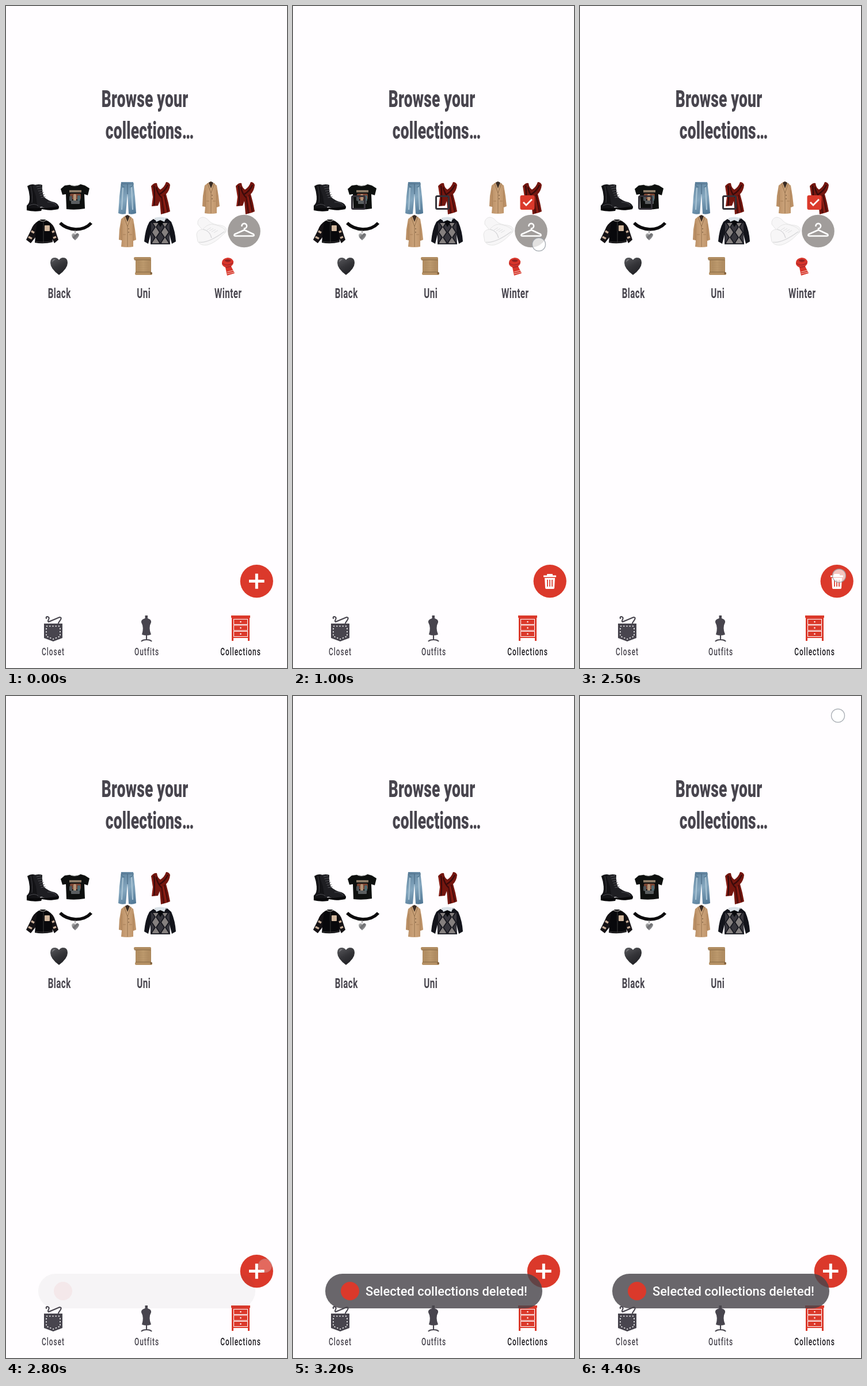
Animation of 488 by 1147 pixels, one loop 4500 ms. Source, as an HTML page with a canvas:

```html
<!DOCTYPE html>
<html lang="en">
<head>
<meta charset="utf-8">
<title>Wardrobe collections</title>
<style>
  html, body { margin: 0; width: 100%; height: 100%; overflow: hidden; background: #fffdff; }
  canvas { display: block; width: 100vw; height: 100vh; }
</style>
</head>
<body>
<canvas id="stage"></canvas>
<script>
const W = 488, H = 1147, LOOP = 4500;
const RED = '#db392b', INK = '#48454e', PAPER = '#fffdff';
const SELECT_AT = 700, DELETE_AT = 2700;
const CONDENSE = 0.66; // the display face is a narrow grotesque

const canvas = document.getElementById('stage');
const ctx = canvas.getContext('2d');
const ratio = window.devicePixelRatio || 1;
canvas.width = W * ratio;
canvas.height = H * ratio;

const clamp = v => Math.max(0, Math.min(1, v));

function shape(d, fill) {
  ctx.fillStyle = fill;
  ctx.fill(new Path2D(d));
}

function line(d, color, width = 1) {
  ctx.strokeStyle = color;
  ctx.lineWidth = width;
  ctx.stroke(new Path2D(d));
}

function disc(x, y, r, fill) {
  ctx.beginPath();
  ctx.arc(x, y, r, 0, Math.PI * 2);
  ctx.fillStyle = fill;
  ctx.fill();
}

function box(x, y, w, h, r, fill) {
  ctx.beginPath();
  ctx.roundRect(x, y, w, h, r);
  ctx.fillStyle = fill;
  ctx.fill();
}

function fade(x0, y0, x1, y1, ...colors) {
  const g = ctx.createLinearGradient(x0, y0, x1, y1);
  colors.forEach((c, i) => g.addColorStop(i / (colors.length - 1), c));
  return g;
}

function at(x, y, draw) {
  ctx.save();
  ctx.translate(x, y);
  draw();
  ctx.restore();
}

function label(text, x, y, size, weight, color, spacing = 0) {
  at(x, y, () => {
    ctx.scale(CONDENSE, 1);
    ctx.font = `${weight} ${size}px Roboto, sans-serif`;
    ctx.letterSpacing = spacing + 'px';
    ctx.textAlign = 'center';
    ctx.fillStyle = color;
    ctx.fillText(text, spacing / 2, 0);
  });
}

// Clothes

function boots() {
  shape('M37 312Q44 307 51 310L55 330L57 345L62 354Q50 357 36 353L36 346Q42 341 41 330Q40 320 37 312Z', '#131316');
  shape('M46 312Q54 307 63 310Q62 322 66 331Q74 338 84 340Q92 343 92 350L72 352L62 348L55 349L52 330Z', '#1e1e22');
  shape('M36 349Q50 352 62 349L70 350L92 347L91 352Q76 355 69 353L62 352L61 355Q48 357 36 354Z', '#08080a');
  for (let i = 0; i < 6; i++) line(`M${53 + i * 1.5} ${313 + i * 3.8}l8 -1.5`, '#55555a', 1);
  line('M43 312Q47 328 45 341', '#3c3c41');
  line('M72 340Q82 339 87 345M40 346Q48 341 56 346', '#4a4a50');
}

function shirt() {
  shape('M110 310Q120 314 130 309L137 311L145 316L142 328L136 326L137 351Q121 354 105 352L104 326L98 327L95 317L102 311Z', '#0e100f');
  line('M110 310Q120 316 130 309', '#2d302d', 1);
  box(110, 319, 21, 4, 0, '#8d7c68');
  box(111, 325, 19, 10, 2, '#7a4432');
  box(110, 329, 5, 9, 2, '#4d5357');
  box(117, 326, 5, 13, 2, '#b29377');
  box(124, 328, 5, 10, 2, '#4f6a70');
  box(113, 337, 15, 6, 1, '#5a5e60');
}

function jacket() {
  const arms = '#151215';
  shape('M57 372Q47 377 43 389L35 405L43 411L54 397Z', arms);
  shape('M73 373Q83 378 86 390L91 405L84 411L77 397Z', arms);
  shape('M54 374L60 370H68L75 374L79 381L81 409Q65 413 50 410L52 390Z', '#08080b');
  line('M44 390l5 3M39 400l6 3M84 390l-4 2M87 400l-5 2', '#c9ae98', 3.5);
  line('M58 371Q64 375 70 371', '#b8b3ae', 1.2);
  line('M65 374V410M50 408Q65 411 81 407', '#4c4948', 0.8);
  box(67, 380, 9, 10, 1, '#d1b79e');
}

function choker() {
  line('M94 376Q104 386 121 387Q138 387 148 376', '#0c0b0d', 5.5);
  line('M120 388V394', '#777', 1.2);
  shape('M120 406Q113 400 114 396Q117 391 120 396Q124 391 127 396Q127 400 120 406Z', fade(114, 393, 126, 405, '#d0d0d0', '#6d6d70', '#a8a8aa'));
}

function jeans() {
  shape('M200 305H221L224 330L226 359Q219 362 213 360L211 325L208 360Q201 362 195 359L197 330Z', fade(196, 305, 226, 361, '#5d819c', '#85a7bf', '#4b7290'));
  line('M200 308H222M211 308V326', '#4b6b85', 1.2);
  line('M203 315L201 353M218 314L220 353', '#a9c3d3', 2.2);
  line('M200 309Q202 314 206 314M221 309Q219 314 215 314', '#42677f', 0.8);
}

// Drawn from its own top left corner
function coat() {
  shape('M10 3L15 0L21 3L26 7L29 25L31 43L26 45L26 55Q16 57 5 55L6 44L1 43L2 25L5 7Z', fade(1, 0, 31, 0, '#b78b61', '#cca47b', '#ba8e64'));
  shape('M12 2L16 0L20 2L16 12Z', '#3a2c24');
  line('M10 3L16 20L22 3M16 20V55', '#94704c', 1);
  line('M6 15V44M26 15V44M8 34h5M19 34h5', '#a37c54', 0.9);
  disc(18, 24, 0.8, '#5a4029');
  disc(18, 30, 0.8, '#5a4029');
}

function scarf() {
  shape('M1 7Q6 1 11 2Q12 10 17 13Q24 9 27 0Q32 0 34 5Q33 15 27 21L31 36L34 51L29 53L18 56L16 33L13 41L2 42L4 26Z', '#74160f');
  line('M6 6Q8 22 6 41M10 9Q12 20 19 27M30 5Q26 15 16 21', '#380a0a', 2.2);
  line('M19 25L23 54M24 22L30 51', '#430b0a', 1.8);
  line('M3 10Q6 25 4 40M22 25L27 53', '#9c2419', 1.2);
}

function sweater() {
  shape('M256 369Q268 377 280 368L287 374Q294 390 295 408L288 412L284 396L285 413H251L251 396L247 412L240 408Q242 386 249 374Z', '#13141b');
  ctx.save();
  ctx.clip(new Path2D('M252 376H284V411H252Z'));
  for (let row = 0; row < 3; row++) {
    for (let col = 0; col < 5; col++) {
      const x = 252 + col * 8, y = 383 + row * 18 - (col % 2) * 9;
      shape(`M${x} ${y - 9}l6 9l-6 9l-6 -9Z`, col % 2 ? '#85807f' : '#37363d');
    }
  }
  ctx.restore();
  shape('M258 368L263 374L268 383L274 374L279 367L268 371Z', '#08090d');
  shape('M258 367Q268 364 278 367L275 374L268 371L261 374Z', '#dbe2e8');
  line('M251 412H285', '#282930', 2);
}

function sneakers() {
  const pair = ['M333 378Q332 368 341 366Q348 366 353 373Q360 379 373 380Q383 382 383 389Q381 396 369 397Q350 394 341 388Z',
                'M331 396Q332 387 342 387Q348 379 357 378Q371 380 379 386Q383 391 377 396Q364 410 350 414Q338 416 333 408Z'];
  pair.forEach(d => {
    shape(d, '#f7f6f7');
    line(d, '#e2e2e3', 0.9);
  });
  line('M335 409Q350 412 379 391M342 387Q354 389 357 402', '#d6d6d8', 1.2);
  for (let i = 0; i < 4; i++) line(`M${349 + i * 4} ${388 + i * 1.6}l7 -4`, '#dfdfe1', 1);
}

function hangerBadge() {
  disc(413.5, 390, 28.3, '#a19d9b');
  ctx.lineCap = ctx.lineJoin = 'round';
  line('M409.5 381A4.3 4.3 0 1 1 414 385.5V388L430 395.5Q432 398.5 428 398.5H399Q395 398.5 397 395.5L414 388', '#fff', 2.6);
  ctx.lineCap = 'butt';
  ctx.lineJoin = 'miter';
}

// Collection symbols

function heart() {
  shape('M92 466Q77 455 77 445Q77 436 84.5 436Q89 436 92 440Q95 436 99 436Q107 436 107 445Q107 455 92 466Z', fade(82, 436, 98, 466, '#56565a', '#343438', '#202024'));
  shape('M80 444Q81 438 86 439Q82 441 80 444Z', '#828286');
}

function parchment() {
  box(225, 439, 27, 24, 0, fade(225, 0, 252, 0, '#ae8a5e', '#c29f72', '#ab875c'));
  box(222, 435, 30, 5, 2, '#b08c61');
  box(224, 461, 30, 5, 2, '#b69165');
  line('M223 440H251M225 461H252', '#846643', 1);
  for (let y = 444; y < 460; y += 3) line(`M229 ${y}h19`, '#a18056', 0.7);
  disc(252, 463, 1.8, '#795c3c');
}

function muffler() {
  shape('M375 444Q376 437 385 436Q392 436 395 442Q396 447 391 451L397 463L384 467L381 453Q374 450 375 444Z', '#d8352b');
  shape('M379 441Q385 437 391 441Q386 446 379 441Z', '#8f2221');
  line('M376 446Q385 452 394 445M382 453L391 451', '#a5282a', 1.5);
  line('M384 461L395 458M384 464L397 461', '#f0c0b5', 1.2);
}

// Controls

function checkbox(x, checked) {
  if (checked) {
    box(x - 12.5, 328, 25, 25, 3, RED);
    line(`M${x - 7} 340l5 5l10 -10`, '#fff', 2.8);
  } else {
    ctx.beginPath();
    ctx.roundRect(x - 10.5, 329.5, 22, 22, 2);
    ctx.strokeStyle = '#343138';
    ctx.lineWidth = 3;
    ctx.stroke();
  }
}

function addButton() {
  disc(435.3, 996.6, 28.6, RED);
  line('M422 996.6H448.6M435.3 983.5V1009.7', '#fff', 5);
}

function deleteButton() {
  disc(446.2, 996.6, 28.6, RED);
  box(435, 986.5, 22, 3, 0.5, '#fff');
  box(441, 984, 10, 4, 1, '#fff');
  shape('M437 991H455L454 1008Q454 1010 452 1010H440Q438 1010 438 1008Z', '#fff');
  line('M442 994V1006M446 994V1006M450 994V1006', RED, 1.7);
}

function pocketIcon() {
  ctx.lineCap = 'round';
  line('M70 1061Q69 1058 72 1058Q76 1059 74 1063Q72 1066 74 1067L93 1059Q97 1059 95 1063L91 1069', INK, 2.2);
  ctx.lineCap = 'butt';
  shape('M66 1070H98V1095L82 1101L66 1095Z', INK);
  ctx.setLineDash([2.2, 3]);
  line('M70 1074.5H95M70 1078V1092L82 1097L94 1092V1077', '#fff', 1.6);
  ctx.setLineDash([]);
}

function mannequinIcon() {
  shape('M241.5 1056H246V1061Q253 1063 252 1068Q247 1077 252 1089Q244 1092 236 1089Q240 1077 235 1068Q234 1063 241.5 1061Z', INK);
  line('M244 1089V1099M235 1101Q237 1098 244 1098Q251 1098 253 1101', INK, 2.2);
}

function drawersIcon() {
  box(391, 1056, 33, 4, 0, RED);
  box(392, 1059, 31, 36, 0, RED);
  box(392, 1094, 3, 6, 0, RED);
  box(420, 1094, 3, 6, 0, RED);
  for (let y = 1062.5; y < 1090; y += 10.5) {
    ctx.strokeStyle = PAPER;
    ctx.lineWidth = 1;
    ctx.strokeRect(395.5, y, 24, 9);
    disc(407.5, y + 4.5, 1.2, PAPER);
  }
}

function navigation() {
  pocketIcon();
  mannequinIcon();
  drawersIcon();
  label('Closet', 81.5, 1125, 18, 500, INK, 1.5);
  label('Outfits', 244, 1125, 18, 500, INK, 1.5);
  label('Collections', 407, 1125, 18, 500, '#1d1b20', 1.5);
}

function toast(t) {
  const u = clamp((t - 2735) / 420);
  if (!u) return;
  const alpha = (1 - Math.cos(u * Math.PI)) / 2;
  ctx.save();
  ctx.globalAlpha = alpha * 0.82;
  box(56, 1001, 377, 60, 30, '#48464b');
  ctx.globalAlpha = alpha;
  disc(99, 1031, 16, RED);
  ctx.font = '500 21.8px Roboto, sans-serif';
  ctx.letterSpacing = '0px';
  ctx.textAlign = 'left';
  ctx.fillStyle = '#fff';
  ctx.fillText('Selected collections deleted!', 126, 1039);
  ctx.restore();
}

// Finger marker: appears at once, fades after release
function touch(t, x, y, down, up, fadeTime) {
  if (t < down) return;
  const alpha = 1 - clamp((t - up) / fadeTime);
  if (!alpha) return;
  ctx.save();
  ctx.globalAlpha = alpha;
  disc(x, y, 12, 'rgba(255,255,255,.7)');
  ctx.beginPath();
  ctx.arc(x, y, 11.5, 0, Math.PI * 2);
  ctx.strokeStyle = 'rgba(125,132,142,.65)';
  ctx.lineWidth = 1.4;
  ctx.stroke();
  ctx.restore();
}

function collections(deleted) {
  boots();
  shirt();
  jacket();
  choker();
  heart();
  label('Black', 92.5, 506, 23, 700, INK, 0.7);

  jeans();
  at(251, 305, scarf);
  at(195, 362, coat);
  sweater();
  parchment();
  label('Uni', 239, 506, 23, 700, INK, 0.7);

  if (deleted) return;
  at(340, 304, coat);
  at(398, 305, scarf);
  sneakers();
  hangerBadge();
  muffler();
  label('Winter', 385.5, 506, 23, 700, INK, 0.7);
}

function draw(t) {
  const deleted = t >= DELETE_AT;
  const selecting = t >= SELECT_AT && !deleted;

  ctx.setTransform(ratio, 0, 0, ratio, 0, 0);
  ctx.fillStyle = PAPER;
  ctx.fillRect(0, 0, W, H);

  label('Browse your', 241, 175, 40, 800, INK, 0.3);
  label('collections…', 249.5, 230, 40, 800, INK, 0.3);
  collections(deleted);

  if (selecting) {
    checkbox(113, false);
    checkbox(259, false);
    checkbox(407, true);
    deleteButton();
  } else {
    addButton();
  }
  navigation();
  toast(t);

  touch(t, 427, 413, 200, 1050, 150);
  touch(t, 450, 987, 2500, 2690, 170);
  touch(t, 448, 34, 4300, LOOP, 100);
}

function frame() {
  draw(performance.now() % LOOP);
  requestAnimationFrame(frame);
}
frame();
</script>
</body>
</html>
```
